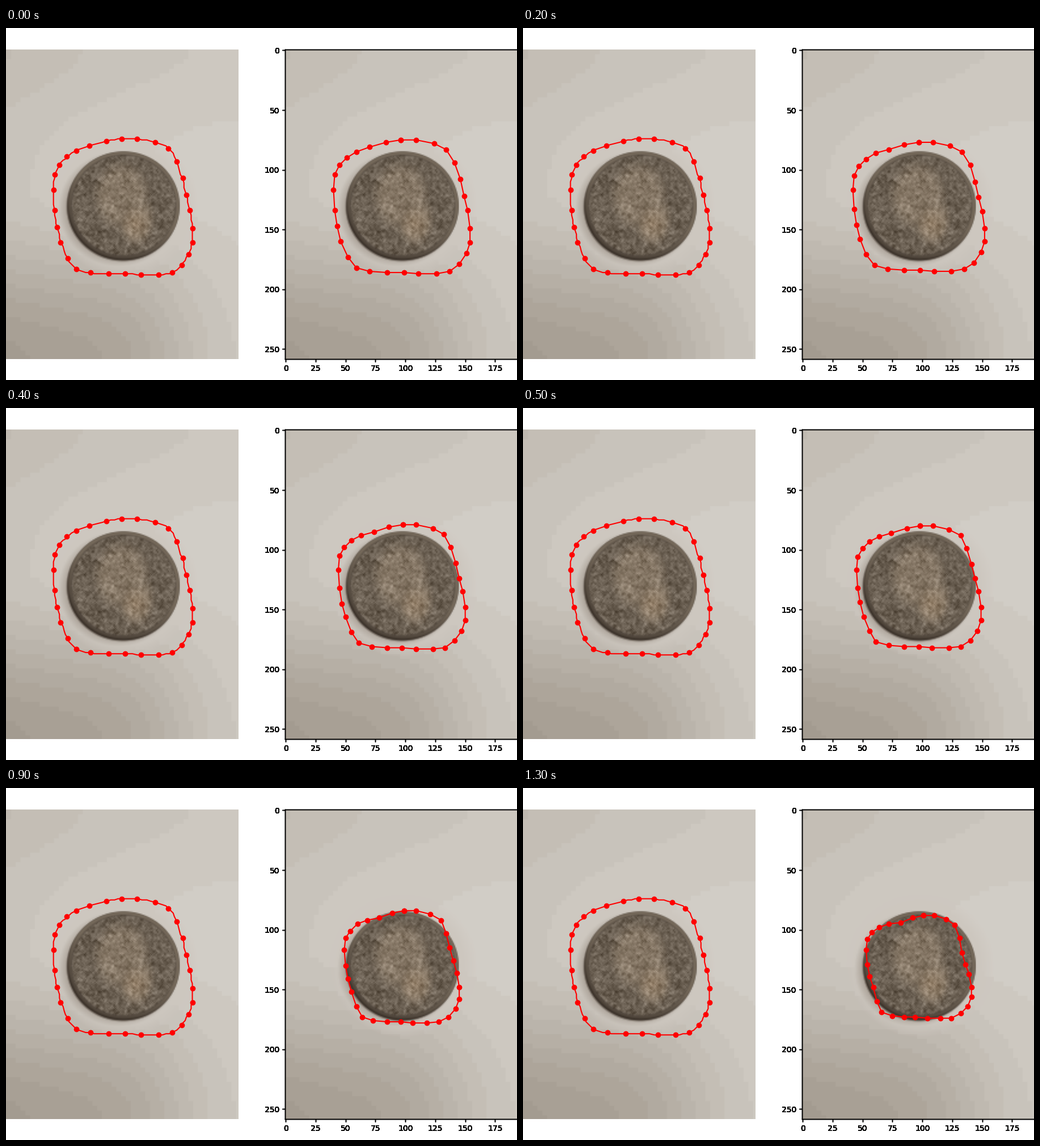
Animation of 901 by 622 pixels, one loop 1.4 s. Source, as a matplotlib script:

```python
import numpy as np
import matplotlib.pyplot as plt
from matplotlib.animation import FuncAnimation

W, H = 901, 622
COLS, ROWS, SCALE = 194, 259, 2.111
FRAMES, DOTS, FINE = 14, 30, 4
OVERPRINTS = 12
CENTER = np.array([98, 131])
plt.rcParams["font.family"] = "DejaVu Sans"
rng = np.random.default_rng(7)

# Corners of the hand-drawn outline, clockwise from the top
KEYS = np.array([(96, 74), (135, 82), (150, 121), (155, 161), (138, 186),
                 (99, 187), (58, 183), (42, 148), (40, 104), (58, 84)], float)


def spline(keys, steps):
    """Closed Hermite curve with the given number of steps per key point."""
    t = (np.arange(steps) / steps)[:, None]
    slopes = 0.42 * (np.roll(keys, -1, 0) - np.roll(keys, 1, 0))
    following = zip(keys, np.roll(keys, -1, 0), slopes, np.roll(slopes, -1, 0))
    return np.vstack([
        a * (1 + 2 * t) * (1 - t) ** 2 + m * t * (1 - t) ** 2
        + b * t ** 2 * (3 - 2 * t) + n * t ** 2 * (t - 1)
        for a, b, m, n in following])


def closed(p):
    return np.vstack([p, p[:1]])


def drift(p):
    """Inward pull with a slight clockwise turn, at most one pixel per axis."""
    inward = CENTER - p
    inward = inward / np.hypot(*inward.T)[:, None]
    sideways = np.column_stack([inward[:, 1], -inward[:, 0]])
    return np.clip(1.3 * inward + 0.3 * sideways, -1, 1)


def smoothstep(t):
    t = np.clip(t, 0, 1)
    return t * t * (3 - 2 * t)


def blur(a, radius):
    for axis in (0, 1):
        a = sum(np.roll(a, s, axis) for s in range(-radius, radius + 1)) / (2 * radius + 1)
    return a


def blend(image, color, amount):
    return image + (np.array(color) - image) * np.clip(amount, 0, 1)[..., None]


def ellipse(x, y, cx, cy, rx, ry):
    return np.hypot((x - cx) / rx, (y - cy) / ry)


def table_top(x, y):
    """Light that falls off to the top and the lower left, in blocky steps."""
    u, v = (x // 4 * 4 + 2) / COLS, (y // 4 * 4 + 2) / ROWS
    level = (204 - 8 * (1 - u) ** 2
             - 9 * np.exp(-(v / 0.2) ** 2) * (1 - 0.4 * u)
             - 40 * smoothstep((v - 0.45) / 0.55) / (1 + (u / 0.75) ** 6))
    level = np.rint(level / 5) * 5
    dim = 204 - level
    return np.stack([level + 5 + 0.08 * dim, level, level - 7 - 0.08 * dim], -1)


def make_photo():
    y, x = np.mgrid[:ROWS, :COLS].astype(float)
    photo = table_top(x, y)

    # Halo and cast shadow
    photo = blend(photo, (205, 199, 191), (1.3 - ellipse(x, y, 98, 131, 47, 46)) * 4)
    photo = blend(photo, (172, 163, 153), (1.1 - ellipse(x, y, 93.5, 133, 46, 44)) * 6)
    photo = blend(photo, (66, 56, 47), (1.015 - ellipse(x, y, 97, 131, 47, 45.7)) * 20)

    # Coin: worn metal, lighter relief and rim
    r = ellipse(x, y, 97.6, 130.2, 46.9, 45.5)
    relief = np.maximum(1.4 - ellipse(x, y, 96, 122, 18, 22),
                        1.4 - ellipse(x, y, 108, 142, 12, 17))
    coin = np.ones(photo.shape) * (108, 97, 84)
    coin = blend(coin, (136, 121, 103), np.clip(relief * 1.6, 0, 0.85))
    coin = blend(coin, (154, 132, 107), 0.7 - 0.6 * ellipse(x, y, 108, 145, 11, 13))
    grain = rng.normal(0, 1, x.shape)
    texture = 7 * grain + 20 * blur(grain, 1) + 25 * blur(rng.normal(0, 1, x.shape), 3)
    coin += (texture * (r < 0.93))[..., None]
    coin = blend(coin, (84, 74, 64), 0.45 - np.abs(r - 0.925) * 16)
    coin = blend(coin, (126, 113, 97), 0.6 - np.abs(r - 0.965) * 18)
    lower_left = np.clip((y - 125 - (x - 98) * 0.6) / 48, 0, 1)
    coin = blend(coin, (58, 49, 41), lower_left * np.clip((r - 0.89) * 10, 0, 1))

    inside = np.clip((1 - r) * 46 + 0.5, 0, 1)
    return np.clip(blend(photo, coin, inside), 0, 255).astype(np.uint8)


def add_panel(left):
    ax = fig.add_axes([left / W, 1 - (38.4 + ROWS * SCALE) / H,
                       COLS * SCALE / W, ROWS * SCALE / H])
    ax.set(xlim=(-0.5, COLS - 0.5), ylim=(ROWS - 0.5, -0.5), facecolor="none")
    return ax


fig = plt.figure(figsize=(W / 100, H / 100), dpi=100, facecolor="white")
photo = make_photo()
outline = np.rint(spline(KEYS, DOTS // len(KEYS) * FINE))
dots = outline[::FINE]
velocity = drift(dots)

left = add_panel(0.3)
left.axis("off")
left.imshow(photo, aspect="auto")
left.plot(*closed(outline).T, "r-", lw=1.5)
left.plot(*dots.T, "ro", ms=6)

# Stacked axes give the labels their heavy, overprinted edges
for layer in range(OVERPRINTS):
    right = add_panel(492)
    right.set_xticks(range(0, 176, 25))
    right.set_yticks(range(0, 251, 50))
    right.spines["right"].set_visible(False)
    if layer == 0:
        right.imshow(photo, aspect="auto")
snake, = right.plot([], [], "ro-", lw=1.5, ms=6)


def update(frame):
    snake.set_data(*closed(np.rint(dots + velocity * (frame + 1))).T)
    return snake,


anim = FuncAnimation(fig, update, frames=FRAMES, interval=100, repeat=True, repeat_delay=0)
plt.show()
```
